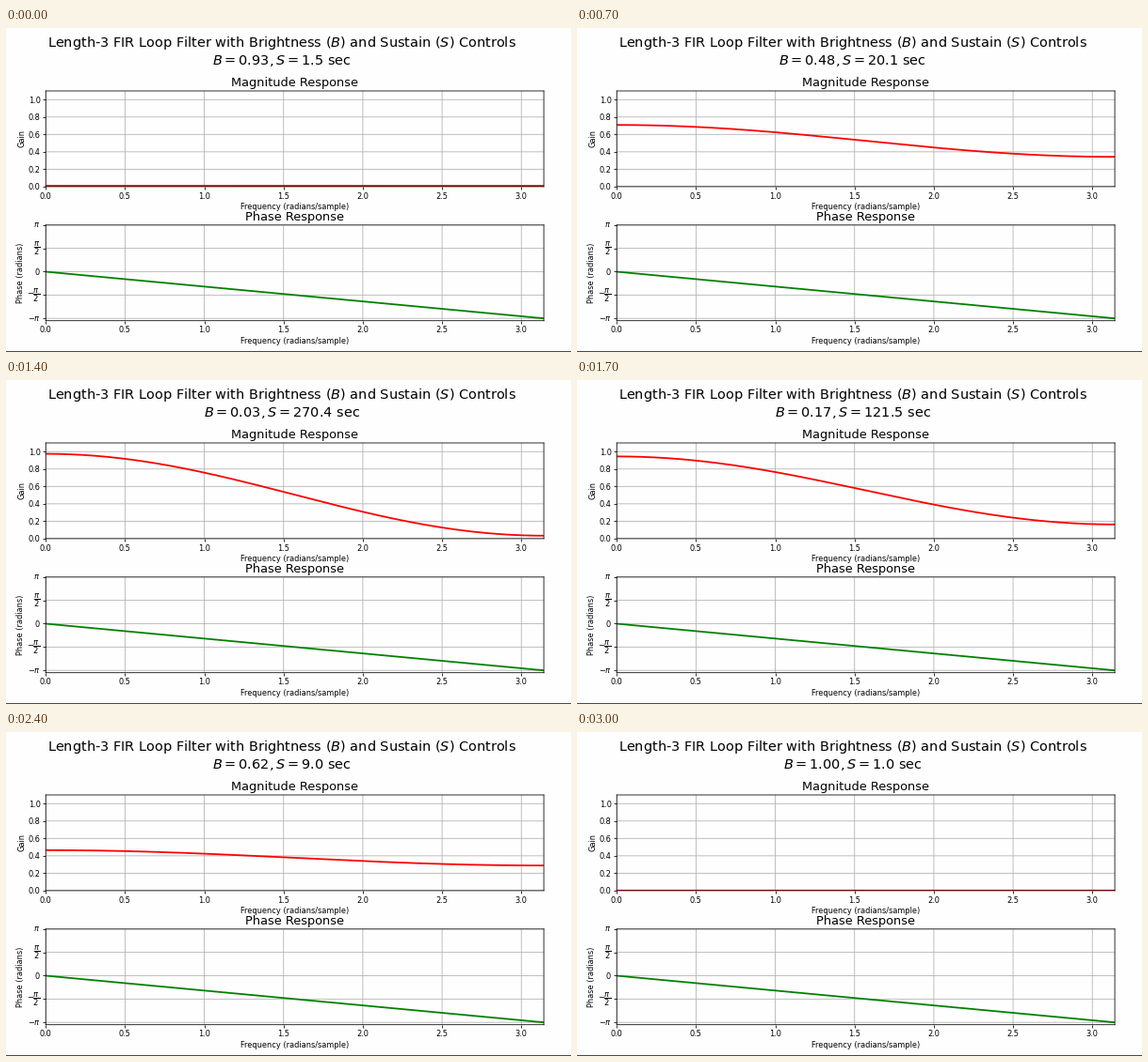
A matplotlib script that plays this animation: 600x345 px, repeating every 3100 ms.

```python
import numpy as np
import matplotlib.pyplot as plt
from matplotlib.animation import FuncAnimation
from matplotlib.patches import Rectangle

W, H, DPI = 600, 345, 60
FRAMES, INTERVAL = 31, 100
STEPS = 29                      # control positions run 0..STEPS and back
PAPER = "#fefefe"


def px(n):
    """Pixels to points."""
    return n * 72 / DPI


plt.rcParams.update({
    "font.family": "DejaVu Sans",
    "font.size": px(8.2),
    "mathtext.fontset": "dejavusans",
    "path.snap": False,
    "axes.titlesize": px(12.9),
    "axes.titlepad": px(5.3),
    "axes.labelpad": px(2.3),
    "axes.labelsize": px(8.2),
    "axes.linewidth": px(0.8),
    "axes.facecolor": PAPER,
    "figure.facecolor": PAPER,
    "grid.color": "#b0b0b0",
    "grid.linewidth": px(0.8),
})
for side in ("xtick", "ytick"):
    plt.rcParams.update({
        f"{side}.labelsize": px(8.2),
        f"{side}.major.size": px(2.85),
        f"{side}.major.width": px(0.8),
        f"{side}.major.pad": px(2.85),
    })

fig = plt.figure(figsize=(W / DPI, H / DPI), dpi=DPI)
omega = np.linspace(0, np.pi, 200)


def make_axes(top, title, ylabel, ylim):
    left, right, height = 42.2, 571.1, 101.9
    ax = fig.add_axes([left / W, 1 - (top + height) / H,
                       (right - left) / W, height / H])
    ax.set(title=title, xlabel="Frequency (radians/sample)", ylabel=ylabel,
           xlim=(0, np.pi), ylim=ylim, xticks=np.arange(0, 3.1, 0.5))
    ax.grid(True)
    return ax


def heading(y, text=""):
    return fig.text(292.6 / W, 1 - y / H, text, ha="center", va="baseline",
                    fontsize=px(14.45))


heading(20, "Length-3 FIR Loop Filter with Brightness ($B$) "
            "and Sustain ($S$) Controls")
values = heading(39)

mag = make_axes(67, "Magnitude Response", "Gain", (0, 1.1))
mag.set_yticks(np.linspace(0, 1, 6))
gain_line, = mag.plot([], [], color="r", lw=px(1.8))

phase = make_axes(209.8, "Phase Response", "Phase (radians)", (-3.3, np.pi))
phase.set_yticks(np.arange(-2, 3) * np.pi / 2,
                 [r"$-\pi$", r"$-\dfrac{\pi}{2}$", "$0$",
                  r"$\dfrac{\pi}{2}$", r"$\pi$"], va="center")
phase.plot(omega, -omega, color="g", lw=px(1.8))

# Dark rule along the bottom edge
fig.add_artist(Rectangle((0, 0), 1, 1 / H, color="#484848", lw=0))


def control_step(frame):
    """Triangle wave over the whole control range, one cycle per loop."""
    pos = int(2.65 + 2 * STEPS * frame / FRAMES) % (2 * STEPS)
    return min(pos, 2 * STEPS - pos)


def update(frame):
    k = control_step(frame)
    bright, sustain = 1 - k / STEPS, np.exp(0.2 * k)
    gain = np.exp(-6.91 / sustain)
    response = gain * ((1 + bright) / 2 + (1 - bright) / 2 * np.cos(omega))
    gain_line.set_data(omega, response)
    values.set_text(f"$B={bright:.2f}, S={sustain:.1f}$ sec")
    return gain_line, values


def init():
    return update(0)


anim = FuncAnimation(fig, update, frames=FRAMES, init_func=init,
                     interval=INTERVAL, repeat=True, repeat_delay=0)
plt.show()
```
